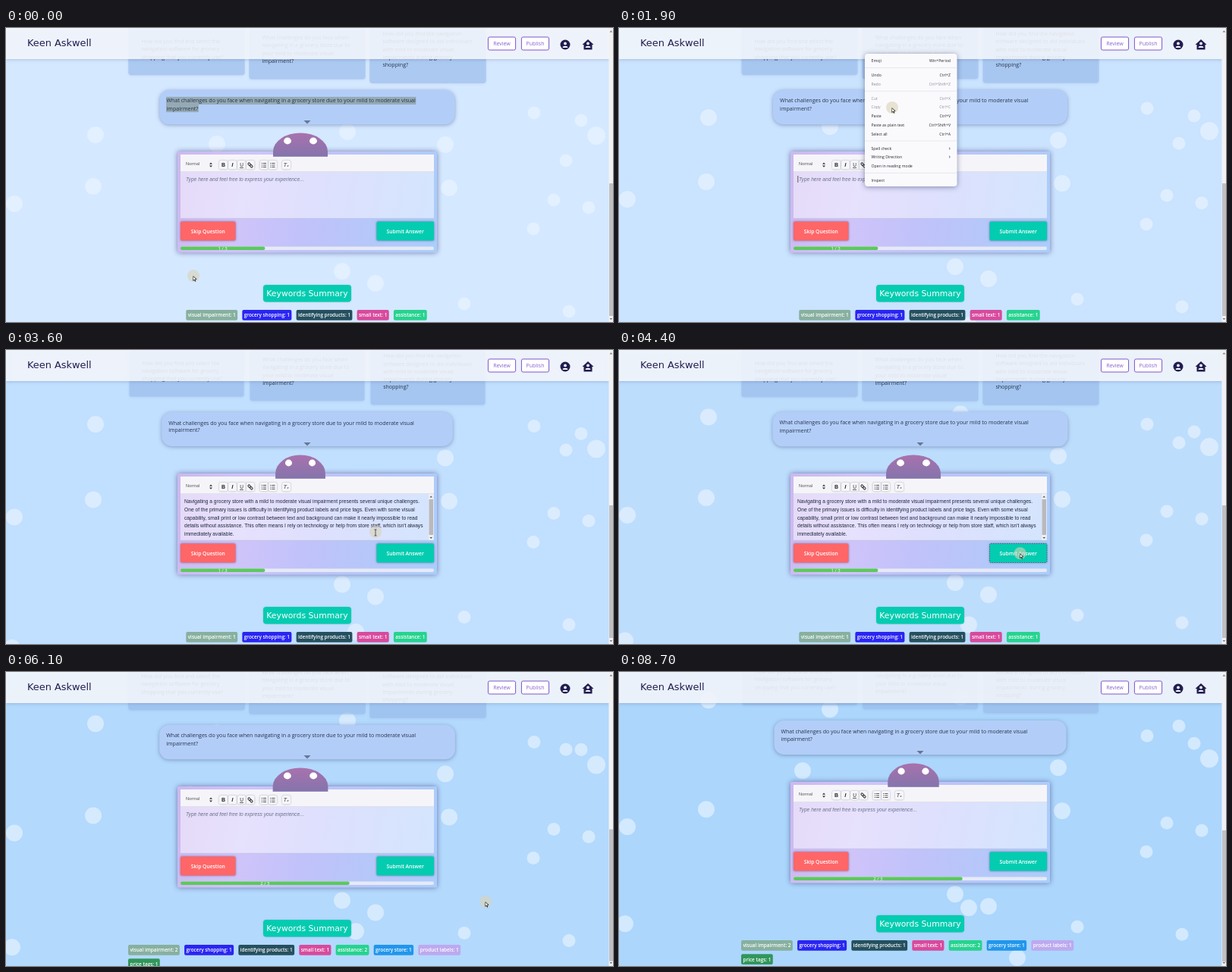
Write an HTML page with a canvas that moves like this. It is 800 px wide and 388 px high and loops after 8800 ms.

```html
<!DOCTYPE html>
<html lang="en">
<head>
<meta charset="utf-8">
<title>Survey page</title>
<style>
html, body { margin: 0; width: 100%; height: 100%; overflow: hidden; background: #d4e8ff; }
canvas { display: block; width: 800px; height: 388px; }
</style>
</head>
<body>
<canvas id="stage" width="800" height="388"></canvas>
<script>
const ctx = document.getElementById('stage').getContext('2d');
const LOOP = 8800, STEP = 100;
const DESELECT = 700, MENU_ON = 1000, PASTE = 2100, SUBMIT = 4300, NEXT = 5800, CURSOR_OFF = 6400;
const SANS = '"Open Sans", "Noto Sans", sans-serif';
const ARIAL = '"Liberation Sans", Arial, sans-serif';
const DISPLAY = '"DejaVu Sans", sans-serif';
const TEAL = '#04ccb0', NAVY = '#211c50', VIOLET = '#8862d2', INK = '#26324a', PALE = '#f6f8fd';

// Where bubbles end up; each layer rises at its own steady pace.
const bubbleLayers = [
  { rise: 28, spots: [[11, 204], [115, 181], [579, 126], [584, 183], [695, 237], [722, 199], [768, 209],
    [778, 114], [696, 84], [758, 94], [604, 336], [487, 309], [443, 293], [742, 346]] },
  { rise: 105, spots: [[278, 48], [242, 129], [450, 32], [118, 36], [738, 70], [461, 310], [8, 331], [525, 376]] }
];

const cards = [
  ['How did you find and select the', 'navigation software for grocery', 'shopping that you currently use?'],
  ['What challenges do you face when', 'navigating in a grocery store due to', 'your mild to moderate visual', 'impairment?'],
  ['How did you find the navigation', 'software designed to aid individuals', 'with mild to moderate visual',
    'impairments during grocery', 'shopping?']
];

const question = [
  'What challenges do you face when navigating in a grocery store due to your mild to moderate visual',
  'impairment?'
];

const answer = [
  'Navigating a grocery store with a mild to moderate visual impairment presents several unique challenges.',
  'One of the primary issues is difficulty in identifying product labels and price tags. Even with some visual',
  'capability, small print or low contrast between text and background can make it nearly impossible to read',
  "details without assistance. This often means I rely on technology or help from store staff, which isn't always",
  'immediately available.'
];

const menu = [
  { Emoji: 'Win+Period' },
  { Undo: 'Ctrl+Z', Redo: 'Ctrl+Shift+Z' },
  { Cut: 'Ctrl+X', Copy: 'Ctrl+C', Paste: 'Ctrl+V', 'Paste as plain text': 'Ctrl+Shift+V', 'Select all': 'Ctrl+A' },
  { 'Spell check': '›', 'Writing Direction': '›', 'Open in reading mode': '' },
  { Inspect: '' }
];
const disabled = ['Redo', 'Cut', 'Copy'];

const keywords = {
  'visual impairment': '#87b09f', 'grocery shopping': '#2a25f2', 'identifying products': '#25505f',
  'small text': '#d84a9d', assistance: '#26d38f', 'grocery store': '#2196ec',
  'product labels': '#bda9ef', 'price tags': '#31965a'
};
const repeated = ['visual impairment', 'assistance'];

// Pointer stops: time, x, y
const stops = [
  [300, 247, 328], [900, 324, 209], [1500, 397, 181], [1900, 360, 106],
  [2100, 347, 116], [3600, 487, 241], [4300, 525, 268], [5200, 632, 304]
];

const mix = (a, b, k) => a + (b - a) * k;
const clamp = v => Math.max(0, Math.min(1, v));
const smooth = k => k * k * (3 - 2 * k);

function box(x, y, w, h, r, fill, stroke) {
  ctx.beginPath();
  ctx.roundRect(x, y, w, h, r);
  if (fill) { ctx.fillStyle = fill; ctx.fill(); }
  if (stroke) { ctx.strokeStyle = stroke; ctx.stroke(); }
}

function shadowBox(x, y, w, h, r, fill, blur, shade, offset = 0) {
  ctx.save();
  ctx.shadowColor = shade;
  ctx.shadowBlur = blur;
  ctx.shadowOffsetY = offset;
  box(x, y, w, h, r, fill);
  ctx.restore();
}

function label(str, x, y, font, color, align = 'left') {
  ctx.font = font;
  ctx.fillStyle = color;
  ctx.textAlign = align;
  ctx.fillText(str, x, y);
}

function oval(x, y, rx, ry, fill, start = 0) {
  ctx.beginPath();
  ctx.ellipse(x, y, rx, ry, 0, start, Math.PI * 2);
  ctx.fillStyle = fill;
  ctx.fill();
}

const disc = (x, y, r, fill) => oval(x, y, r, r, fill);
const dome = (x, y, rx, ry, fill) => oval(x, y, rx, ry, fill, Math.PI);

function arrow(x, y, w, h, fill) {
  ctx.beginPath();
  ctx.moveTo(x - w, y);
  ctx.lineTo(x + w, y);
  ctx.lineTo(x, y + h);
  ctx.fillStyle = fill;
  ctx.fill();
}

function line(x1, y1, x2, y2, color, width = 1) {
  ctx.beginPath();
  ctx.moveTo(x1, y1);
  ctx.lineTo(x2, y2);
  ctx.lineWidth = width;
  ctx.strokeStyle = color;
  ctx.stroke();
  ctx.lineWidth = 1;
}

function scaled(cx, cy, k, paint) {
  ctx.save();
  ctx.translate(cx, cy);
  ctx.scale(k, k);
  ctx.translate(-cx, -cy);
  paint();
  ctx.restore();
}

function drawBubbles(t) {
  for (const { rise, spots } of bubbleLayers) {
    for (const [x, y] of spots) {
      const r = x < 600 ? 11 : x > 770 ? 12 : 8.5;
      disc(x, y + rise * (1 - t / LOOP), r, 'rgba(236,245,255,0.6)');
    }
  }
}

function drawCards(k) {
  cards.forEach((lines, i) => {
    const cx = 238 + 159 * i, bottom = 62 + 5.3 * i;
    scaled(cx, bottom - 35, k, () => {
      shadowBox(cx - 76, bottom - 75, 152, 75, 4, 'rgba(156,190,238,0.62)', 3, 'rgba(100,130,190,0.2)', 1);
      lines.forEach((s, n) => label(s, cx - 59, bottom - 21.5 - (lines.length - 1 - n) * 10.2, '7px ' + SANS, INK));
    });
  });
}

function drawQuestion(k, selected) {
  scaled(397, 104.5, k, () => {
    shadowBox(204.5, 82, 385, 45, 13, '#b2cef8', 5, 'rgba(70,90,140,0.5)', 1);
    question.forEach((s, i) => {
      ctx.font = '7px ' + SANS;
      if (selected) {
        ctx.fillStyle = 'rgba(139,158,158,0.75)';
        ctx.fillRect(213, 91 + i * 10, ctx.measureText(s).width + 1, 10);
      }
      label(s, 213.5, 98.5 + i * 10, ctx.font, INK);
    });
  });
  arrow(397, 122, 4.5, 4.5, '#667795');
}

function drawMonster(s) {
  const w = 67.5 + 5.5 * s, cx = 388;
  const g = ctx.createLinearGradient(0, 139, 0, 170);
  g.addColorStop(0, '#a872ad');
  g.addColorStop(1, '#8474ac');
  dome(cx, 163, w / 2, 24.5, g);
  ctx.fillRect(cx - w / 2, 162.8, w, 7);
  for (const side of [-1, 1]) oval(cx + side * w * 0.236, 149, w * 0.069, 4.4, '#fff');
}

function drawToolbar() {
  ctx.fillStyle = '#f5f5f9';
  ctx.fillRect(230, 167, 334, 23);
  line(230, 189.5, 564, 189.5, '#d3d3df', 0.6);
  label('Normal', 237, 181, '5.6px ' + ARIAL, '#555');
  arrow(270, 181.5, 2, 2.2, '#333');
  arrow(270, 179.8, 2, -2.2, '#333');
  const tool = (x, paint) => {
    shadowBox(x - 5.5, 175, 11, 11.5, 2, '#f6f6fa', 2, 'rgba(60,60,100,0.5)');
    paint(x);
  };
  const letter = (s, font) => x => label(s, x, 183.2, font, '#222', 'center');
  const list = x => {
    for (let y = 178.5; y < 185; y += 2.5) {
      line(x - 1.2, y, x + 3, y, '#333', 0.8);
      line(x - 3.2, y, x - 2.2, y, '#333');
    }
  };
  const link = x => {
    ctx.save();
    ctx.translate(x, 181);
    ctx.rotate(Math.PI / 4);
    for (const dx of [-3.8, -0.2]) box(dx, -1.3, 4, 2.6, 1.3, null, '#333');
    ctx.restore();
  };
  tool(286.5, letter('B', 'bold 7px ' + ARIAL));
  tool(298.5, letter('I', 'italic bold 7px ' + SANS));
  tool(310.5, letter('U', '6.5px ' + ARIAL));
  line(308, 184.5, 313, 184.5, '#222', 0.7);
  tool(322, link);
  tool(340, list);
  tool(351.5, list);
  tool(369.5, letter('Tₓ', 'italic 6.5px ' + DISPLAY));
}

function drawEditor(t) {
  ctx.fillStyle = 'rgba(255,255,255,0.48)';
  ctx.fillRect(230, 190, 334, 61.5);
  line(230, 251.3, 564, 251.3, 'rgba(140,150,180,0.5)', 0.6);
  if (t >= PASTE && t < NEXT) {
    answer.forEach((s, i) => label(s, 235, 202.2 + i * 10.65, '6.67px ' + ARIAL, '#20263c'));
    ctx.fillStyle = '#eeeef2';
    ctx.fillRect(557, 190, 6.5, 61);
    ctx.fillStyle = '#b9b9bd';
    ctx.fillRect(557.5, 197, 5.5, 47);
    arrow(560.2, 194.5, 1.8, -2, '#555');
    arrow(560.2, 247, 1.8, 2, '#555');
    return;
  }
  label('Type here and feel free to express your experience...', 237, 202, 'italic 6.67px ' + ARIAL, '#687089');
  if (t >= DESELECT && t < PASTE) line(235.8, 195, 235.8, 204, '#222', 0.7);
}

function drawButton(x, w, name, fill) {
  shadowBox(x, 255.5, w, 25, 1.5, fill, 3, 'rgba(50,45,95,0.55)');
  label(name, x + w / 2, 270.5, '600 6.75px ' + SANS, '#fff', 'center');
}

function drawPanel(t) {
  const g = ctx.createLinearGradient(226, 200, 568, 260);
  ['#cdb9f0', '#cfc4fa', '#c1c2fa', '#b6c7fa', '#abcdfb'].forEach((c, i) => g.addColorStop(i / 4, c));
  shadowBox(226, 163, 342, 133.5, 2, g, 7, 'rgba(65,65,125,0.65)');
  drawToolbar();
  drawEditor(t);
  drawButton(230, 72.5, 'Skip Question', '#ff6668');
  drawButton(488.5, 75.5, 'Submit Answer', TEAL);
  if (t >= SUBMIT && t < NEXT) {
    ctx.setLineDash([1.5, 1.5]);
    box(488.5, 255.5, 75.5, 25, 1.5, null, 'rgba(39,86,95,0.7)');
    ctx.setLineDash([]);
  }
  const step = t < NEXT ? 1 : 2, w = 334 * step / 3;
  ctx.save();
  box(230, 288.5, 334, 4.5, 2, '#e5eaf5');
  box(230, 288.5, w, 4.5, 2, '#5cc95c');
  ctx.clip();
  label(step + ' / 3', 230 + w / 2, 293, '6px ' + SANS, '#fff', 'center');
  ctx.restore();
}

function drawKeywords(t) {
  shadowBox(339, 339, 116, 22.5, 4, TEAL, 2, 'rgba(60,110,130,0.35)');
  label('Keywords Summary', 397, 354.3, '10.8px ' + DISPLAY, '#fff', 'center');
  const gap = 6.2, left = 161, right = 633, later = t >= NEXT;
  ctx.font = '600 6.4px ' + SANS;
  const chips = Object.keys(keywords).slice(0, later ? 8 : 5).map(name => {
    const text = `${name}: ${later && repeated.includes(name) ? 2 : 1}`;
    return { text, color: keywords[name], w: ctx.measureText(text).width + 4.8 };
  });
  const total = chips.reduce((sum, c) => sum + c.w + gap, -gap);
  let x = Math.max(left, 396 - total / 2), y = 372;
  for (const { text, color, w } of chips) {
    if (x + w > right) { x = left; y += 18.2; }
    box(x, y, w, 13.8, 2, color);
    label(text, x + w / 2, y + 9.3, ctx.font, '#fff', 'center');
    x += w + gap;
  }
}

function drawHeader() {
  shadowBox(0, 0, 795, 41, 0, 'rgba(250,252,255,0.86)', 4, 'rgba(80,100,150,0.35)', 1);
  label('Keen Askwell', 28, 23.5, '12.9px ' + DISPLAY, NAVY);
  for (const [x, name] of [[635.5, 'Review'], [679.5, 'Publish']]) {
    shadowBox(x, 12, 36, 17, 2, '#fff', 2, 'rgba(90,60,160,0.4)');
    box(x, 12, 36, 17, 2, null, VIOLET);
    label(name, x + 18, 23, '7px ' + SANS, VIOLET, 'center');
  }
  disc(737, 22, 6.5, NAVY);
  arrow(767, 22, 7.5, -7, NAVY);
  ctx.fillRect(761.5, 21.5, 11, 7);
  for (const x of [737, 767]) {
    disc(x, 20.4, 1.9, PALE);
    dome(x, 26, 3.4, 2.2, PALE);
  }
}

function drawScrollbar(shift) {
  ctx.fillStyle = '#f1f1f3';
  ctx.fillRect(794.5, 0, 5.5, 388);
  ctx.fillStyle = '#c0c0c3';
  ctx.fillRect(795, 205 + shift * 0.22, 5, 175 - shift * 0.08);
  arrow(797.4, 5.5, 1.8, -2.2, '#777');
  arrow(797.4, 383, 1.8, 2.2, '#777');
}

function drawMenu() {
  shadowBox(324, 34, 121.5, 175, 4, '#fafafd', 7, 'rgba(40,50,90,0.5)', 1);
  let y = 43;
  menu.forEach((group, i) => {
    if (i) {
      y += 7.3;
      line(324, y - 9.5, 445.5, y - 9.5, '#dedee6', 0.7);
    }
    for (const [name, keys] of Object.entries(group)) {
      const color = disabled.includes(name) ? '#8d8d98' : '#24242e';
      label(name, 332.5, y + 2, '5.2px ' + SANS, color);
      label(keys, 437, y + 2, (keys === '›' ? 8 : 5.2) + 'px ' + SANS, color, 'right');
      y += 11.7;
    }
  });
}

function pointerAt(t) {
  const next = stops.findIndex(p => p[0] > t);
  if (next <= 0) return (next ? stops[stops.length - 1] : stops[0]).slice(1);
  const [t0, x0, y0] = stops[next - 1], [t1, x1, y1] = stops[next];
  const k = smooth((t - t0) / (t1 - t0));
  return [mix(x0, x1, k), mix(y0, y1, k)];
}

function drawCursor(t) {
  const [x, y] = pointerAt(t);
  disc(x, y - 1, 8, 'rgba(218,210,182,0.6)');
  ctx.save();
  ctx.translate(x, y);
  if (t > PASTE && x > 235 && y > 190 && y < 251) {
    line(0, -4, 0, 4, '#333', 0.8);
    for (const end of [-4, 4]) line(-1.5, end, 1.5, end, '#333', 0.8);
  } else {
    ctx.rotate(-0.4);
    arrow(0, 5, 2.8, -6, '#222');
    arrow(0, 4.2, 1.7, -4, '#fff');
    line(0, 4.5, 0, 7, '#222', 1.2);
  }
  ctx.restore();
}

function draw(t) {
  const s = -Math.cos((t - 5200) / 1000 * Math.PI);
  const pulse = 1 + 0.013 * s;
  const tone = clamp(t / 7500);
  const shift = 18 * clamp((t - NEXT) / 450);
  ctx.fillStyle = `rgb(${mix(212, 172, tone)},${mix(232, 214, tone)},${mix(255, 252, tone)})`;
  ctx.fillRect(0, 0, 800, 388);
  drawBubbles(t);
  ctx.save();
  ctx.translate(0, -shift);
  drawCards(pulse);
  drawQuestion(pulse, t < DESELECT);
  drawPanel(t);
  drawMonster(s);
  drawKeywords(t);
  ctx.restore();
  drawHeader();
  drawScrollbar(shift);
  if (t >= MENU_ON && t < PASTE) drawMenu();
  if (t < CURSOR_OFF) drawCursor(t);
}

function tick() {
  const t = performance.now() % LOOP;
  draw(Math.floor(t / STEP) * STEP);
  requestAnimationFrame(tick);
}
tick();
</script>
</body>
</html>
```
